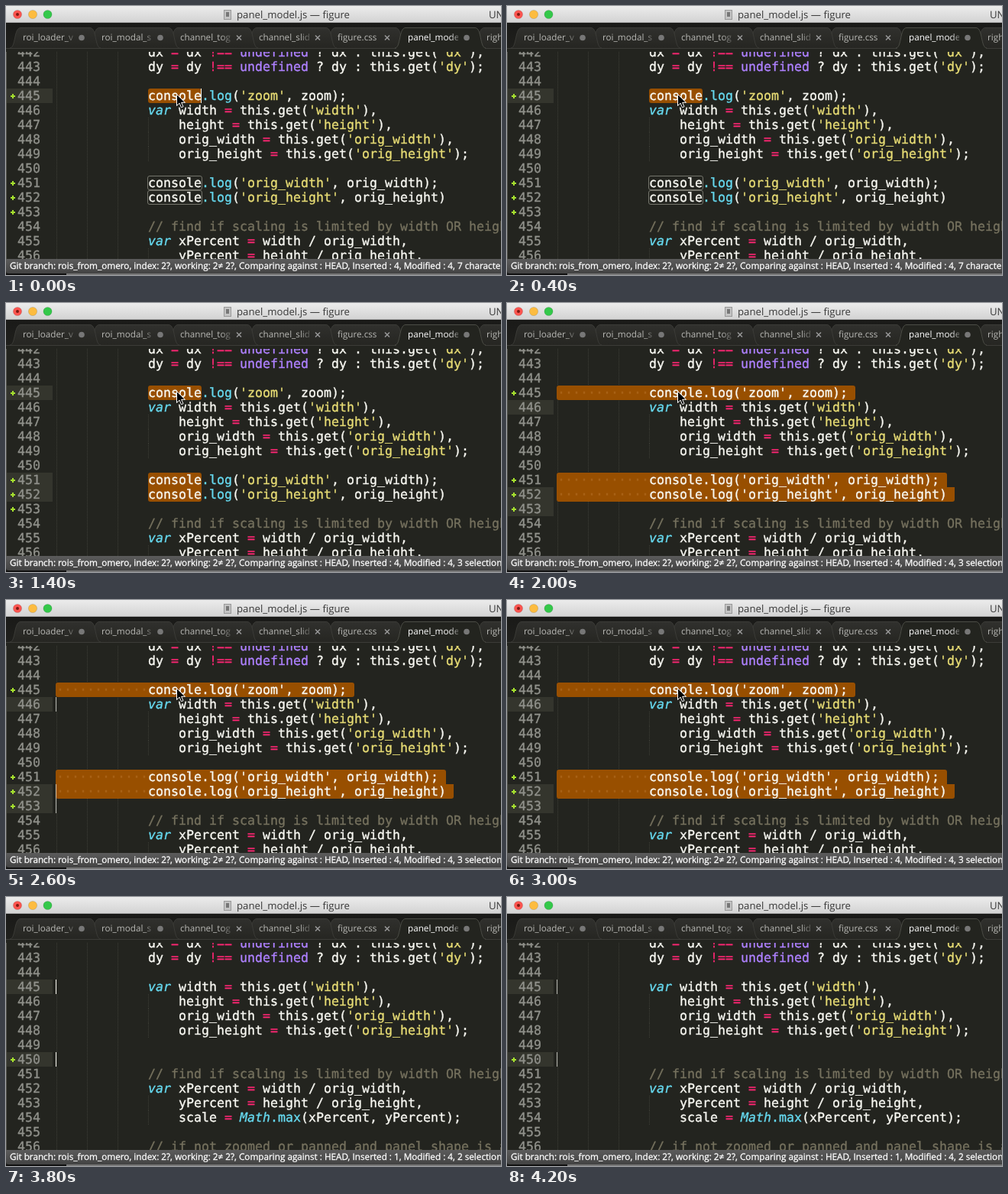
Write an HTML page that moves like this. It is 648 by 352 pixels and loops after 4.4 s.

```html
<!DOCTYPE html>
<html>
<head>
<meta charset="utf-8">
<style>
html, body { margin: 0; width: 648px; height: 352px; overflow: hidden; background: #23241f; }
body { position: relative; text-rendering: geometricPrecision; font-family: "Open Sans", sans-serif; }
body > *, #code * { position: absolute; }
#code { inset: 0; font: 16.61px/19px "DejaVu Sans Mono", monospace; color: #f8f8f2; white-space: pre; -webkit-text-stroke: .35px; }
#code span, #code i { position: static; }
.guide { width: 1px; background: repeating-linear-gradient(#3d3e37 0 1px, transparent 1px 2px); }
.active { left: 0; width: 61px; height: 19px; background: #34352d; }
.number { left: 15px; color: #8f908a; }
.plus { left: 6px; width: 6px; height: 6px; margin-top: 7px;
  background: linear-gradient(#a6e22e, #a6e22e) 50% / 100% 2px no-repeat, linear-gradient(#a6e22e, #a6e22e) 50% / 2px 100% no-repeat; }
.sel { height: 19px; background: #984f00; }
.box { left: 185px; width: 70px; height: 17px; border: 1px solid #75756c; border-radius: 3px; }
.dots { left: 66px; color: #b8742c; opacity: .5; }
.caret { width: 1px; height: 19px; background: #f8f8f0; }
.text { left: 186px; }
.key { color: #66d9ef; } .op { color: #f92672; } .str { color: #e6db74; }
.const { color: #ae81ff; } .note { color: #75715e; }
#status { left: 0; top: 331px; width: 643px; height: 19px; padding-left: 5px; overflow: hidden; white-space: pre;
  font-size: 11.72px; line-height: 18px; color: #fff; -webkit-text-stroke: .3px;
  background: linear-gradient(#5b5b5b, #434343); border-radius: 0 0 0 4px; }
#edge { left: 0; top: 350px; width: 648px; height: 2px; background: linear-gradient(90deg, #111 79px, #777 79px); }
#side { left: 0; top: 60px; width: 1px; height: 271px; background: #55554f; }
</style>
</head>
<body>
<div id="code"></div>
<div id="side"></div>
<svg id="chrome" width="648" height="60" style="left:0;top:0"></svg>
<div id="edge"></div>
<div id="status"></div>
<svg id="pointer" width="16" height="22" style="left:222px;top:114px">
  <path d="M1.5 1.5V16.5L5.1 13.1 7.5 18.7 10 17.7 7.6 12.3H12.5Z" fill="#000" stroke="#fff"/>
</svg>
<script>
const $ = id => document.getElementById(id);
const FIRST = 442, ROW = 19, CH = 10;
const rowTop = n => 108 + (n - 445) * ROW;

const before = `dx = dx !== undefined ? dx : this.get('dx');
dy = dy !== undefined ? dy : this.get('dy');

console.log('zoom', zoom);
var width = this.get('width'),
    height = this.get('height'),
    orig_width = this.get('orig_width'),
    orig_height = this.get('orig_height');

console.log('orig_width', orig_width);
console.log('orig_height', orig_height)

// find if scaling is limited by width OR height
var xPercent = width / orig_width,
    yPercent = height / orig_height,
    scale = Math.max(xPercent, yPercent);

// if not zoomed or panned and panel shape is about`.split('\n');
const after = before.filter(line => !line.startsWith('console'));

const logs = [445, 451, 452], added = [...logs, 453];
const states = [
  { at: 0, sel: [445], boxes: [451, 452], tail: '7 characters selected' },
  { at: 600, sel: [445, 451], boxes: [452], tail: '2 selection regions' },
  { at: 1000, sel: logs, tail: '3 selection regions' },
  { at: 1600, sel: logs, whole: true, active: [446, 452, 453], tail: '3 selection regions' },
  { at: 3200, lines: after, active: [445, 450], plus: [445, 450], tail: '2 selection regions' },
  { at: 3800, lines: after, active: [445, 450], plus: [450], inserted: 1, tail: '2 selection regions' }
];

const tokens = /(\/\/.*)|('[^']*')|\b(var|Math)\b|(\.(?:log|max))|\b(undefined)\b|(!==|=)/g;
const colour = line => line.replace(tokens, (m, note, str, word, call, constant) =>
  word ? `<i class="key">${m}</i>` :
  `<span class="${note ? 'note' : str ? 'str' : call ? 'key' : constant ? 'const' : 'op'}">${m}</span>`);

const item = (cls, n, content = '', style = '') =>
  `<div class="${cls}" style="top:${rowTop(n)}px;${style}">${content}</div>`;

function show({ sel = [], boxes = [], whole, lines = before, active = sel, plus = added, inserted = 4, tail }) {
  let html = '';
  for (const x of [66, 106, 146]) html += `<div class="guide" style="left:${x}px;top:60px;height:272px"></div>`;
  for (const n of active) html += item('active', n);
  lines.forEach((line, i) => {
    const n = FIRST + i;
    if (n > 456) return;
    if (line.startsWith('    ')) html += item('guide', n, '', 'left:186px;height:19px');
    const selected = sel.includes(n);
    if (selected) {
      const left = whole ? 65 : 186;
      const right = 186 + (whole ? line.length + 1 : 7) * CH;
      const up = sel.includes(n - 1) ? 0 : 3, down = sel.includes(n + 1) ? 0 : 3;
      html += item('sel', n, '', `left:${left}px;width:${right - left}px;border-radius:${up}px ${up}px ${down}px ${down}px`);
      if (whole) html += item('dots', n, '·'.repeat(12));
    }
    if (boxes.includes(n)) html += item('box', n);
    html += item('number', n, n) + item('text', n, selected && whole ? line : colour(line));
  });
  for (const n of plus) html += item('plus', n);
  const caretX = sel.length && !whole ? 255 : 65;
  for (const n of active) html += item('caret', n, '', `left:${caretX}px`);
  $('code').innerHTML = html;
  $('status').textContent = 'Git branch: rois_from_omero, index: 2?, working: 2≠ 2?, Comparing against : HEAD, ' +
    `Inserted : ${inserted}, Modified : 4, ${tail}`;
  $('pointer').style.display = lines === after ? 'none' : '';
}

function drawChrome() {
  const tab = ([x, name, dirty, close = 77], i) => {
    const on = i === 5, l = x - 17, r = x + close + 25, cx = x + close;
    const mark = dirty ? `<circle cx="${cx}" cy="41.5" r="3.8" fill="#777"/>`
      : `<path d="M${cx - 3} 38.5l6 6m0-6l-6 6" stroke="#999" stroke-width="1.5"/>`;
    return `<path d="M${l} 55C${l + 8} 55 ${l + 5} 28.5 ${l + 14} 28.5H${r - 14}C${r - 5} 28.5 ${r - 8} 55 ${r} 55"
      fill="${on ? '#23241f' : 'url(#tab)'}" stroke="${on ? '#4c4d46' : '#3c3c38'}"/>
      <svg x="${x}" y="28" width="${close - 11}" height="26"><text y="17" font-size="11.7"
      fill="${on ? 'url(#lit)' : 'url(#dim)'}">${name}</text></svg>${mark}`;
  };
  const fade = (id, c) => `<linearGradient id="${id}" gradientUnits="userSpaceOnUse" x1="0" x2="68">
    <stop offset=".8" stop-color="${c}"/><stop offset="1" stop-color="${c}" stop-opacity=".2"/></linearGradient>`;
  const shade = (id, a, b) => `<linearGradient id="${id}" x2="0" y2="1"><stop stop-color="${a}"/><stop offset="1" stop-color="${b}"/></linearGradient>`;
  const tabs = [[22, 'roi_loader_view.js', 1], [125, 'roi_modal_shape.js', 1], [228, 'channel_toggle.js'],
    [331, 'channel_slider.js'], [434, 'figure.css', 0, 65], [526, 'panel_model.js', 1], [629, 'right_panel.js']].map(tab);
  const active = tabs.splice(5, 1);
  const light = (x, c) => `<circle cx="${x}" cy="11" r="5.6" fill="${c}" stroke="#000" stroke-opacity=".12"/>`;
  $('chrome').innerHTML = `<defs>${fade('lit', '#fff')}${fade('dim', '#b8b8b4')}
    ${shade('bar', '#ececec', '#d2d2d2')}${shade('tab', '#30302d', '#262622')}${shade('strip', '#1a1a18', '#20201d')}</defs>
    <rect y="22" width="648" height="38" fill="url(#strip)"/>
    ${tabs.reverse().join('')}
    <rect y="55" width="648" height="5" fill="#23241f"/><path d="M0 55.5H648" stroke="#3c3c38"/>${active}
    <path d="M511 55.5H627" stroke="#23241f"/>
    <rect width="648" height="22" fill="url(#bar)"/><path d="M0 21.5H648" stroke="#aaa"/>
    ${light(15, '#fc5550')}${light(35, '#fdbc40')}${light(54.5, '#34c84a')}
    <circle cx="15" cy="11" r="2" fill="#7d1912"/>
    <rect x="285.5" y="5.5" width="9" height="12" fill="#c4c4c4" stroke="#999"/>
    <rect x="288" y="8" width="4" height="6" fill="#777"/>
    <g font-size="13.2" fill="#383838"><text x="302" y="16">panel_model.js — figure</text>
    <text x="632" y="16">UNREGISTERED</text></g>`;
}

drawChrome();
let current;
function tick(now) {
  const t = Math.floor(now % 4400 / 200) * 200;
  const state = states.findLast(s => s.at <= t);
  if (state !== current) show(current = state);
  // The caret stays solid after an edit, then fades in and out once a second.
  const since = t - (state.inserted ? 3200 : state.at);
  const glow = since < 300 ? 1 : .5 + 1.5 * Math.cos(2 * Math.PI * (since / 1000 + .23));
  for (const caret of document.querySelectorAll('.caret')) caret.style.opacity = Math.max(0, Math.min(1, glow));
  requestAnimationFrame(tick);
}
tick(performance.now());
</script>
</body>
</html>
```
